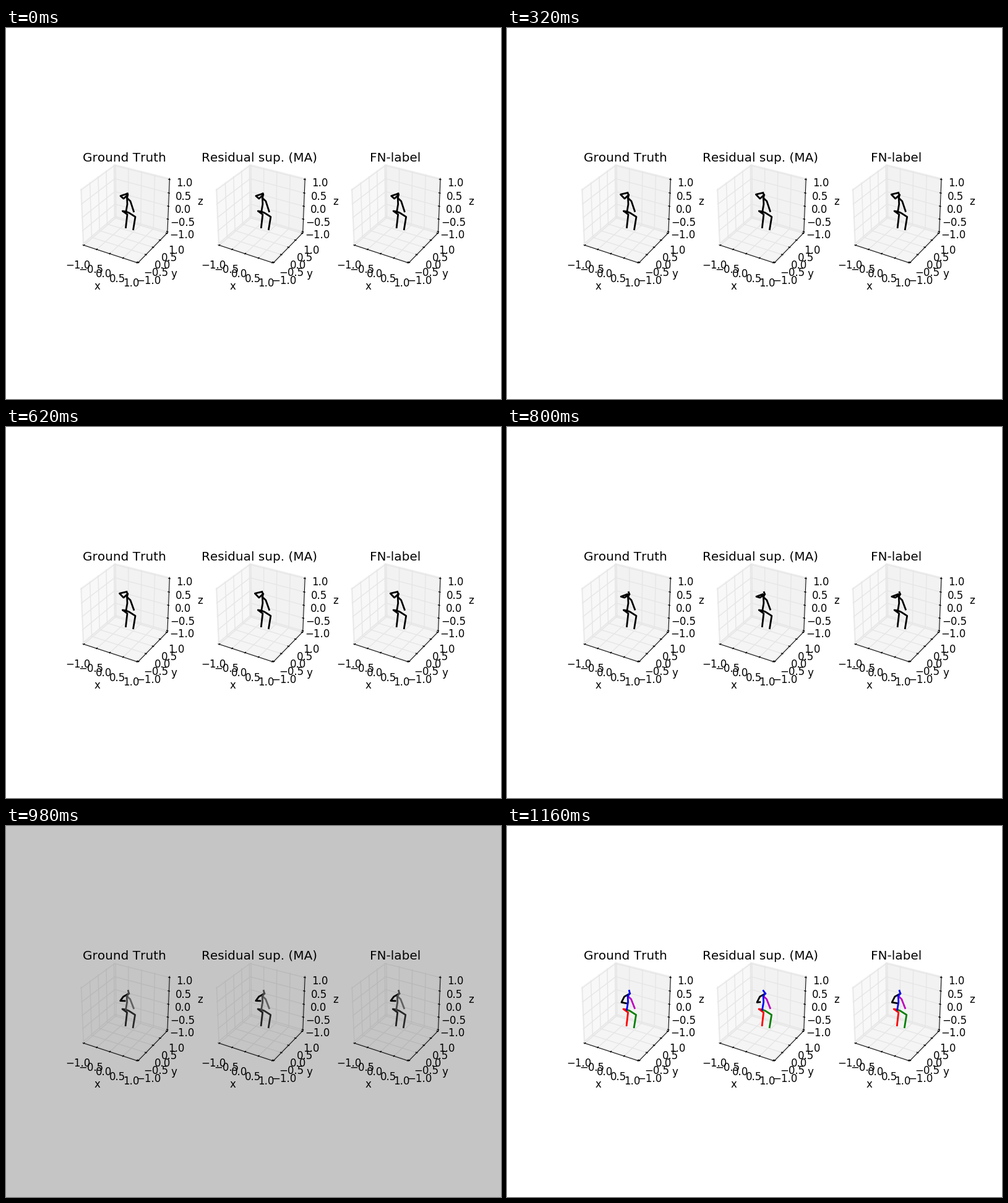
Write a matplotlib script that moves like this. It is 800 by 600 pixels and loops after 1.18 s.

```python
import numpy as np
import matplotlib.pyplot as plt
from matplotlib.animation import FuncAnimation
from matplotlib.collections import LineCollection
from matplotlib.patches import Polygon

plt.rcParams["font.family"] = "DejaVu Sans"
plt.rcParams["text.kerning_factor"] = 6

W, H, DPI = 800, 600, 100
STEP_MS, FRAMES = 20, 59
GREY_FRAME = 49

SIDE = 620 / 3.4              # side of one square panel
PITCH = SIDE * 1.2
SCALE = SIDE / 0.185
CX, CY = 100 + 0.095 * SCALE, H / 2 + SIDE / 2 - 0.095 * SCALE
LO, HI = -1 - 1 / 24, 1 + 1 / 24
BACK = np.array([LO, HI, LO])  # corner where the three panes meet
TICKS = np.linspace(-1, 1, 5)
TICK_PAD, NAME_PAD = 0.3656, 0.792
TITLES = ("Ground Truth", "Residual sup. (MA)", "FN-label")

fig = plt.figure(figsize=(W / DPI, H / DPI), dpi=DPI, facecolor="white")
ax = fig.add_axes([0, 0, 1, 1])
ax.set(xlim=(0, W), ylim=(H, 0))
ax.axis("off")


# --- cube -----------------------------------------------------------------

def project(points, shift=0):
    """Perspective view at elevation 30, azimuth -60, in stage pixels."""
    p = np.atleast_2d(np.asarray(points, float)) / 2
    e, a = np.radians(30), np.radians(-60)
    right = np.array([-np.sin(a), np.cos(a), 0])
    up = np.array([-np.sin(e) * np.cos(a), -np.sin(e) * np.sin(a), np.cos(e)])
    toward = np.cross(right, up)
    k = SCALE / (10 - p @ toward)
    return np.column_stack([CX + shift + (p @ right) * k, CY - (p @ up) * k])


def flipped(point, *dims):
    """The point mirrored through the middle of the cube along some axes."""
    out = point.copy()
    out[list(dims)] *= -1
    return out


def label(x, y, text, size=12, va="baseline"):
    ax.text(x, y, text, fontsize=size, ha="center", va=va, color="black", zorder=5)


def stroke(points, width, shift):
    ax.plot(*project(points, shift).T, color="black", lw=width,
            solid_capstyle="projecting", zorder=3)


def draw_axis(name, dim, tick_dim, corner, shift):
    side = np.sign(corner)
    side[dim] = 0

    def at(value):
        point = np.array(corner, float)
        point[dim] = value
        return point

    stroke([at(LO), at(HI)], 0.75, shift)
    reach = np.zeros(3)
    reach[tick_dim] = side[tick_dim] / 60
    for t in TICKS:
        stroke([at(t) + reach, at(t) - 2 * reach], 1, shift)
        x, y = project(at(t) + TICK_PAD * side, shift)[0]
        label(x, y + 14.1, f"{t:.1f}".replace("-", "\u2212"))
    x, y = project(at(0) + NAME_PAD * side, shift)[0]
    label(x, y, name, va="center")


def draw_panel(index):
    shift = index * PITCH
    lines = []
    for dim, tone in enumerate((0.95, 0.90, 0.925)):
        a, b = (dim + 1) % 3, (dim + 2) % 3
        square = [BACK, flipped(BACK, a), flipped(BACK, a, b), flipped(BACK, b)]
        color = (tone, tone, tone, 0.5)
        panes.append(ax.add_patch(Polygon(project(square, shift), facecolor=color,
                                          edgecolor=color, lw=1, zorder=1)))
        for t in TICKS:
            path = np.array([flipped(BACK, a), BACK, flipped(BACK, b)])
            path[:, dim] = t
            lines.append(project(path, shift))
    grids.append(ax.add_collection(LineCollection(lines, linewidths=1, zorder=2)))
    draw_axis("x", 0, 1, (LO, LO, LO), shift)
    draw_axis("y", 1, 0, (HI, LO, LO), shift)
    draw_axis("z", 2, 0, (HI, HI, LO), shift)
    label(100 + SIDE / 2 + shift, 216.47, TITLES[index], size=14.4)


# --- figure ---------------------------------------------------------------

# opening pose, in pixels of the first panel
JOINTS = {
    "root": (194, 297), "belly": (196, 285), "chest": (195.6, 275),
    "neck": (196.7, 269.9), "head": (195.5, 268),
    "shoulder": (190, 276), "elbow": (185, 271.6), "hand": (196.5, 267.8),
    "far_shoulder": (201, 280), "far_hand": (206.4, 296.6),
    "hip": (188.4, 296), "knee": (196, 301.5), "foot": (193.6, 322.5),
    "far_hip": (199, 299), "far_knee": (209, 305.4), "far_foot": (205.7, 325.6),
}
# joint, move in x and y, start and end in ms
MOVES = (
    ("elbow", -1.5, -2.4, 0, 320), ("hand", -1.5, -1.4, 0, 320),
    ("elbow", 1.9, 16, 620, 1100), ("hand", -3.2, 20.6, 680, 1100),
    ("hand", 2.8, 0, 1000, 1160),
    ("neck", 2.3, 1.1, 620, 1000), ("head", 2.4, -1.6, 620, 1000),
    ("far_hand", 0.3, -2, 0, 1160),
)
# joints, colour, tone in the grey flash
LIMBS = (
    ("chest far_shoulder far_hand", (0.75, 0, 0.75), "#606060"),
    ("root hip knee foot", "red", "#202020"),
    ("root far_hip far_knee far_foot", "green", "#282828"),
    ("neck shoulder elbow hand", "black", "black"),
    ("root belly chest neck head", "blue", "#484848"),
)
JUMP = (-0.4, -0.2, -0.9)      # sideways step when the prediction starts
HAND_DRIFT = (0, -4.4, -0.8)   # later drift of the predicted hand


def ease(t, start, end):
    u = np.clip((t - start) / (end - start), 0, 1)
    return u * u * (3 - 2 * u)


def pose(frame, index):
    t = frame * STEP_MS
    joints = {name: np.array(p, float) for name, p in JOINTS.items()}
    for name, dx, dy, start, end in MOVES:
        joints[name] += ease(t, start, end) * np.array([dx, dy])
    drift = HAND_DRIFT[index] * ease(t, 960, 1160)
    joints["hand"] += (drift, drift / 2)
    joints["head"][0] += drift / 2
    step = JUMP[index] if frame >= GREY_FRAME else 0
    return {name: p + (index * PITCH + step, 0) for name, p in joints.items()}


panes, grids = [], []
for i in range(len(TITLES)):
    draw_panel(i)
bodies = [[ax.plot([], [], lw=2, solid_capstyle="projecting",
                   solid_joinstyle="round", zorder=4)[0] for _ in LIMBS]
          for _ in TITLES]


def update(frame):
    grey = frame == GREY_FRAME
    fig.set_facecolor("#c5c5c5" if grey else "white")
    for pane in panes:
        pane.set_visible(not grey)
    for grid in grids:
        grid.set_color("#b9b9b9" if grey else "0.9")
    for i, body in enumerate(bodies):
        joints = pose(frame, i)
        for line, (names, color, tone) in zip(body, LIMBS):
            line.set_data(*np.array([joints[n] for n in names.split()]).T)
            line.set_color(tone if grey else color if frame > GREY_FRAME else "black")
    return panes + grids + sum(bodies, [])


anim = FuncAnimation(fig, update, frames=FRAMES, interval=STEP_MS,
                     repeat=True, repeat_delay=0, blit=False)
plt.show()
```
